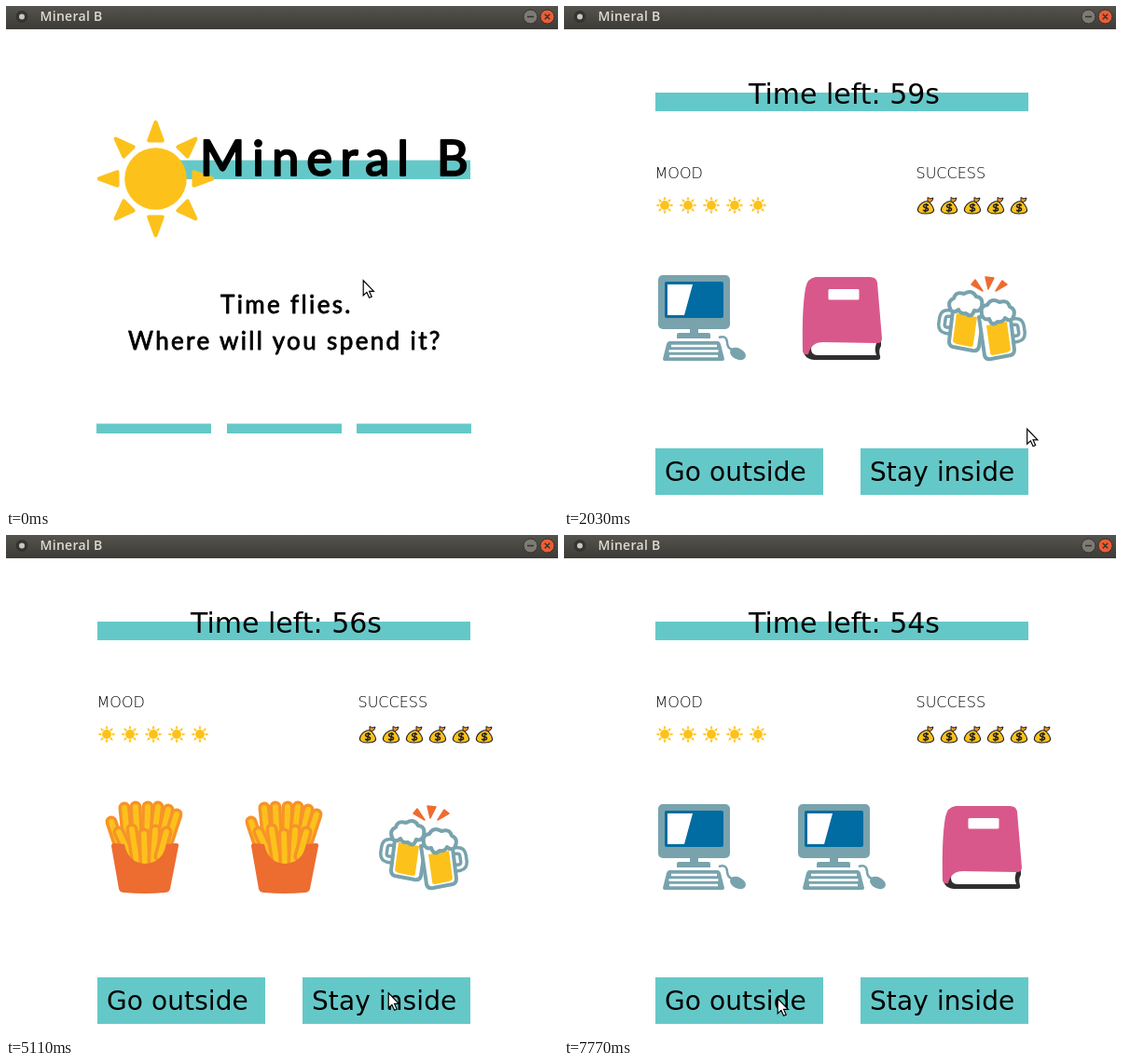
Recreate the animation shown at these times as an HTML page. Size 592 by 538 pixels, loop 8 s.

```html
<!DOCTYPE html>
<html lang="en">
<head>
<meta charset="utf-8">
<title>Mineral B</title>
<style>
  html, body { margin: 0; width: 100%; height: 100%; overflow: hidden; background: #fff; }
  svg { display: block; }
  .teal { fill: #65c8c8; }
  .round { font-family: Lato, "Open Sans", sans-serif; stroke: #000; stroke-linejoin: round; }
  .title { font-size: 52px; letter-spacing: 8.4px; stroke-width: 2.2px; }
  .motto { font-size: 26px; letter-spacing: 2.36px; stroke-width: .8px; }
  .sans { font-family: "DejaVu Sans", Verdana, sans-serif; }
  .thin { font: 200 16px "DejaVu Sans Light", "DejaVu Sans", sans-serif; }
  .button { font-size: 28px; letter-spacing: .1px; }
  .bar { font: 600 14px "Open Sans", "Noto Sans", sans-serif; letter-spacing: .3px; fill: #dfdbd2; }
</style>
</head>
<body>
<svg width="592" height="538" viewBox="0 0 592 538">
  <defs>
    <linearGradient id="chrome" x2="0" y2="1">
      <stop offset="0" stop-color="#55534d"/>
      <stop offset="1" stop-color="#3c3b37"/>
    </linearGradient>

    <g id="sun" fill="#fcc21b">
      <circle r="33.3"/>
      <g id="rays" stroke="#fcc21b" stroke-width="4" stroke-linejoin="round"></g>
    </g>

    <g id="bag" stroke="#222" stroke-linejoin="round">
      <path d="M2 -4 L2 -8.5 L5 -7 L8 -8 L7 -5 L4 -3Z" fill="#f79329" stroke-width="1"/>
      <path d="M-1 -4 Q3 -5 5 -2 Q9 3 8.5 6 Q7 9 0 9 Q-8 9 -8.7 5 Q-8 -1 -1 -4Z" fill="#fcc21b" stroke-width="1.2"/>
      <path d="M3 0 Q-2 -2 -2.5 1 Q-2 2.5 0 2.7 Q3 3 2.5 5 Q1 7 -3 5.3 M1 -2 L-.6 7.6" fill="none" stroke-width="1.5"/>
    </g>

    <g id="fries">
      <g id="sticks" stroke-linecap="round"></g>
      <path fill="#ed6c30" d="M15 49 Q15 46 18 46 L29 47 Q33 67 51 68 Q70 67 74 47 L84 46 Q88 46 87 49 L78 95 Q77 99 72 99 Q51 101 29 99 Q24 99 23 95Z"/>
    </g>

    <path id="grip" fill="none" d="M19 45 L13 45 Q9 45 8 50 L7 57 Q7 62 11 63 L17 64"/>
    <g id="mug" stroke="#78a3ad" stroke-width="4" stroke-linejoin="round">
      <use href="#grip" stroke-width="10"/>
      <use href="#grip" stroke="#fff" stroke-width="3"/>
      <path fill="#fff" d="M20 34 L15 75 Q15 80 19 81 L40 85 Q46 86 47 81 L53 40Z"/>
      <path fill="#fcc21b" stroke="none" d="M23 45 L19 75 Q20 77 23 78 L38 81 Q41 81 41 78 L45 49Z"/>
      <path fill="#fff" d="M17 42 Q12 32 20 29 Q22 21 31 24 Q40 19 44 27 Q52 28 50 37 Q48 44 42 42 Q39 51 33 45 Q27 46 25 41 Q21 45 17 42Z"/>
    </g>
    <g id="beer">
      <use href="#mug"/>
      <use href="#mug" transform="translate(100 9) scale(-1 1)"/>
      <path fill="#ed6c30" stroke="#ed6c30" stroke-width="1.5" stroke-linejoin="round"
        d="M39 14 L43 9 L51 21Z M54 6 L63 7 L57 19Z M72 10 L77 14 L65 21Z"/>
    </g>

    <g id="computer" fill="#78a3ad">
      <rect x="3" y="4" width="77" height="58" rx="5"/>
      <rect x="10" y="11" width="63" height="39" rx="2" fill="#006ca2"/>
      <path d="M13 14 H40 L31 47 H13Z" fill="#fff"/>
      <path d="M37 61 H46 V66 H57 Q59 66 59 68 V72 H23 V68 Q23 66 25 66 H37Z"/>
      <path d="M15 75 H67 Q69 75 70 78 L74 94 Q74 96 72 96 H10 Q8 96 8 94 L12 78 Q13 75 15 75Z"/>
      <path d="M17 80 H66 M14.5 85.5 H67.5 M15 91 H67" stroke="#fff" stroke-width="2.6"/>
      <path d="M68 71 Q76 68 77 76 Q77 82 82 84" fill="none" stroke="#78a3ad" stroke-width="2.5"/>
      <ellipse cx="88.5" cy="88.5" rx="9" ry="6" transform="rotate(27 88.5 88.5)"/>
    </g>

    <g id="book">
      <path fill="#2f2f2f" d="M8 78 Q7 94 20 95 L88 95 Q92 95 91 91 Q89 85 92 80 L92 74 L20 75Z"/>
      <path fill="#fff" d="M24 75 L88 75 Q84 83 87 90 L24 90 Q17 90 17 83 Q17 77 24 75Z"/>
      <path fill="#d9588c" d="M8 85 Q7 40 11 18 Q13 7 22 6 L80 6 Q87 6 88 12 L93 72 Q93 77 88 77 L30 76 Q17 76 14 89 Q8 90 8 85Z"/>
      <rect x="35.5" y="19" width="33" height="11.5" rx="1.5" fill="#fff"/>
    </g>
  </defs>

  <rect width="592" height="538" fill="#fff"/>

  <rect width="592" height="25" fill="url(#chrome)"/>
  <circle cx="17" cy="11.5" r="6.5" fill="#353430"/>
  <circle cx="17" cy="11.5" r="3" fill="#c9c7c1"/>
  <text class="bar" x="36.5" y="16">Mineral B</text>
  <g stroke="#33322e">
    <circle cx="562.5" cy="11.5" r="7.5" fill="#7d7a73"/>
    <circle cx="580.5" cy="11.5" r="7.5" fill="#ec5d34"/>
    <path d="M559 11.5 H566 M577.8 8.8 L583.2 14.2 M583.2 8.8 L577.8 14.2" stroke-width="1.4"/>
  </g>

  <g id="intro">
    <rect class="teal" x="170" y="165.6" width="328" height="20.4"/>
    <use href="#sun" x="160.5" y="185.5"/>
    <text class="round title" x="208" y="181.5">Mineral B</text>
    <text class="round motto" x="230" y="329.5">Time flies.</text>
    <text class="round motto" x="131" y="368.5">Where will you spend it?</text>
    <path class="teal" d="M97 448.6h123v10.4h-123z M237 448.6h123v10.4h-123z M376 448.6h123v10.4h-123z"/>
  </g>

  <g id="game">
    <rect class="teal" x="98" y="93" width="400" height="20"/>
    <text id="timer" class="sans" x="198" y="105" font-size="30"></text>
    <text class="thin" x="97.5" y="185">MOOD</text>
    <text class="thin" x="377.5" y="185">SUCCESS</text>
    <g id="mood"></g>
    <g id="success"></g>
    <use class="reel" x="98" y="285"/>
    <use class="reel" x="248" y="285"/>
    <use class="reel" x="398" y="285"/>
    <path class="teal" d="M98 475h180v50h-180z M318 475h180v50h-180z"/>
    <text class="sans button" x="108" y="510">Go outside</text>
    <text id="stay" class="sans button" x="328" y="510">Stay inside</text>
  </g>

  <path id="cursor" d="M.2 .8 V16.8 L3.9 13.4 L6.6 19.3 L9.2 18.2 L6.6 12.4 H11.4Z" fill="#fff" stroke="#000" stroke-width="1.2"/>
</svg>

<script>
const LOOP = 8000, TICK = 70, GAME_START = 2030;
const $ = id => document.getElementById(id);
const range = n => [...Array(n).keys()];

// Each step is [start time, value]; the latest one reached applies.
const TIMER = [[0, 59], [2520, 58], [3850, 57], [5110, 56], [6440, 55], [7770, 54]];
const REELS = [
  [0, 'computer book beer'],
  [2590, 'fries beer fries'],
  [3430, 'fries computer fries'],
  [4340, 'book book book'],
  [5110, 'fries fries beer'],
  [6020, 'computer fries beer'],
  [6930, 'book computer beer'],
  [7770, 'computer computer book']
];
const STAY = [[0, '#000'], [2940, '#fff'], [3080, '#000'], [4900, '#fff'], [5040, '#000']];
const BAGS = [[0, 5], [4970, 6]];

// Pointer moves: one position per tick from the start time.
const move = (start, points) => points.map((p, i) => [start + i * TICK, p]);
const POINTER = [
  [0, [383, 294]],
  ...move(1190, [[388, 287], [398, 274], [414, 259], [436, 251], [462, 262],
    [485, 300], [500, 365], [504, 425], [496.5, 453.5]]),
  ...move(2520, [[490, 462], [472, 473], [447, 483], [424, 489], [410, 491]]),
  ...move(6020, [[385, 492], [325, 494], [262, 496], [229, 497]])
];

const at = (steps, t) => steps.findLast(s => s[0] <= t)[1];

$('rays').innerHTML = range(8).map(i =>
  `<path d="M0 -60.7 L7.3 -41 H-7.3Z" transform="rotate(${i * 45})"/>`).join('');

const STICKS = [
  [15, 23, 28, 62], [29, 8, 33, 50], [41, 7, 43, 50], [54, 7, 53, 50],
  [65, 7, 60, 50], [76, 10, 67, 50], [85, 15, 72, 55],
  [23, 34, 35, 60], [37, 31, 42, 65], [50, 36, 51, 66], [62, 32, 60, 65], [74, 34, 67, 60]
];
$('sticks').innerHTML = STICKS.map(([x, y, u, v]) =>
  [['#f79329', 13], ['#fcc21b', 6]].map(([color, width]) =>
    `<path d="M${x} ${y} L${u} ${v}" stroke="${color}" stroke-width="${width}"/>`).join('')).join('');

const row = (icon, x, n, scale) => range(n).map(i =>
  `<use href="#${icon}" transform="translate(${x + i * 25} 214) scale(${scale})"/>`).join('');
$('mood').innerHTML = row('sun', 108, 5, .148);
$('success').innerHTML = row('bag', 388, 6, 1);
const lastBag = $('success').lastChild;
const reels = document.querySelectorAll('.reel');

function draw(t) {
  const playing = t >= GAME_START;
  $('intro').style.display = playing ? 'none' : '';
  $('game').style.display = playing ? '' : 'none';
  $('timer').textContent = `Time left: ${at(TIMER, t)}s`;
  $('stay').style.fill = at(STAY, t);
  lastBag.style.display = at(BAGS, t) > 5 ? '' : 'none';
  const icons = at(REELS, t).split(' ');
  reels.forEach((reel, i) => reel.setAttribute('href', '#' + icons[i]));
  $('cursor').setAttribute('transform', `translate(${at(POINTER, t)})`);
}

const begin = performance.now();
function frame() {
  draw((performance.now() - begin) % LOOP);
  requestAnimationFrame(frame);
}
frame();
</script>
</body>
</html>
```
